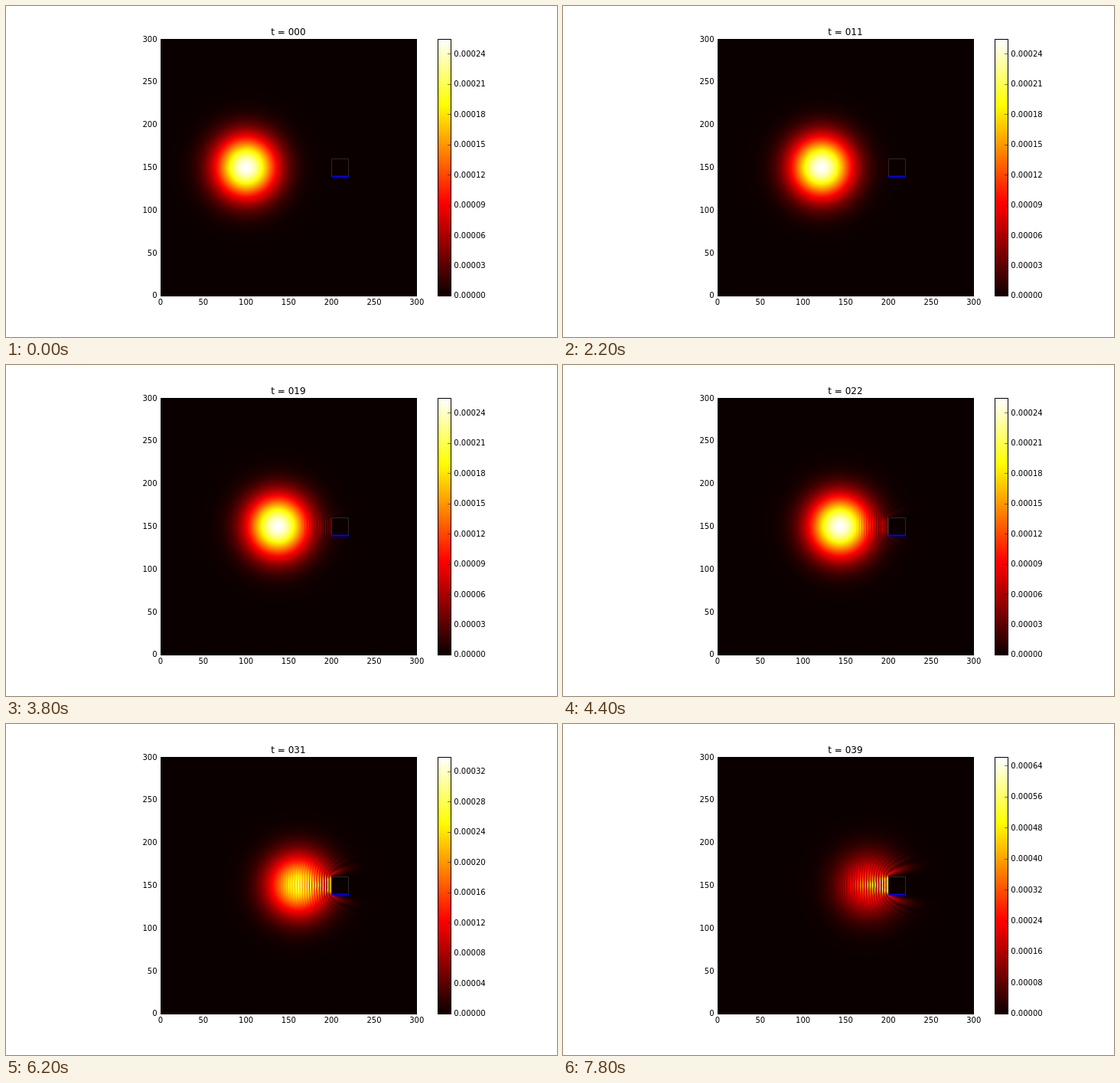
An HTML page with a canvas for the animation above (8 s loop, 720 px wide and 432 px high).

```html
<!DOCTYPE html>
<html lang="en">
<head>
<meta charset="utf-8">
<title>Wave packet hitting a square obstacle</title>
<style>
  html, body { margin: 0; width: 100%; height: 100%; overflow: hidden; background: #fff; }
  canvas, svg { position: absolute; left: 0; top: 0; width: 720px; height: 432px; }
  text { font: 10px "DejaVu Sans", sans-serif; fill: #000; }
  .title { font-size: 12px; }
  .middle { text-anchor: middle; }
  .end { text-anchor: end; }
  .edge { fill: none; stroke: #000; }
</style>
</head>
<body>
<canvas width="720" height="432"></canvas>
<svg viewBox="0 0 720 432">
  <defs>
    <linearGradient id="hot" x1="0" y1="1" x2="0" y2="0">
      <stop offset="0" stop-color="#0b0000"/>
      <stop offset=".365" stop-color="#f00"/>
      <stop offset=".746" stop-color="#ff0"/>
      <stop offset="1" stop-color="#fff"/>
    </linearGradient>
  </defs>
  <rect class="edge" x="202.5" y="43.5" width="334" height="335"/>
  <path d="M425.5 222V199.5H447.5V222" fill="none" stroke="#2d2723"/>
  <path d="M425 222.5H448" stroke="#00f" stroke-width="2"/>
  <rect class="edge" x="564.5" y="43.5" width="17" height="335" style="fill:url(#hot)"/>
  <text id="title" class="title middle" x="369" y="38"></text>
  <g id="axes"></g>
  <g id="scale"></g>
</svg>
<script>
const N = 300, FRAMES = 40, FRAME_MS = 200;
const LEFT = 201.6, BOTTOM = 378, SIZE = 334.8, UNIT = SIZE / N;
const SIGMA = 25, PEAK = 1 / (2 * Math.PI * SIGMA ** 2);

// Schrödinger equation on a lattice; OFFSET puts the packet's energy at zero.
const K = 1.1, SPEED = 1.95, SUBSTEPS = 5, DT = 1 / SUBSTEPS;
const HOP = SPEED / (2 * Math.sin(K));
const OFFSET = 2 * HOP * (Math.cos(K) + 1);
const WALL = { left: 200, right: 220, low: 140, high: 160 };

const re = new Float32Array(N * N), im = new Float32Array(N * N);

function initPacket() {
  for (let y = 0; y < N; y++) {
    for (let x = 0; x < N; x++) {
      const amp = Math.exp(-((x - 100) ** 2 + (y - 150) ** 2) / (4 * SIGMA ** 2));
      re[y * N + x] = amp * Math.cos(K * x);
      im[y * N + x] = amp * Math.sin(K * x);
    }
  }
}

function kick(dst, src, dt) {
  const self = dt * OFFSET, hop = dt * HOP;
  for (let y = 1; y < N - 1; y++) {
    for (let i = y * N + 1, end = y * N + N - 1; i < end; i++) {
      dst[i] += self * src[i] - hop * (src[i - 1] + src[i + 1] + src[i - N] + src[i + N]);
    }
  }
  for (let y = WALL.low; y <= WALL.high; y++) {
    dst.fill(0, y * N + WALL.left, y * N + WALL.right + 1);
  }
}

function advance() {
  kick(im, re, -DT / 2);
  for (let s = 1; s <= SUBSTEPS; s++) {
    kick(re, im, DT);
    kick(im, re, s < SUBSTEPS ? -DT : -DT / 2);
  }
}

// Top of the colour scale relative to the initial peak.
const gain = t => 1 + 0.00588 * Math.max(0, t - 24) ** 2.07;

function paintDensity(t) {
  const tile = document.createElement('canvas');
  tile.width = tile.height = N;
  const ctx = tile.getContext('2d');
  const image = ctx.createImageData(N, N), top = gain(t);
  for (let y = 0; y < N; y++) {
    for (let x = 0; x < N; x++) {
      const i = y * N + x, p = 4 * ((N - 1 - y) * N + x);
      const v = (re[i] ** 2 + im[i] ** 2) / top;
      image.data[p] = 255 * (0.0416 + 0.9584 * v / 0.365);
      image.data[p + 1] = 255 * (v - 0.365) / 0.381;
      image.data[p + 2] = 255 * (v - 0.746) / 0.254;
      image.data[p + 3] = 255;
    }
  }
  ctx.putImageData(image, 0, 0);
  return tile;
}

const label = (x, y, text, cls = '') => `<text class="${cls}" x="${x}" y="${y}">${text}</text>`;
const baseline = y => Math.round(y + 3.4);

function axisLabels() {
  let out = '';
  for (let v = 0; v <= N; v += 50) {
    out += label(LEFT + v * UNIT + 0.4, 390, v, 'middle');
    out += label(197.6, baseline(BOTTOM - v * UNIT), v, 'end');
  }
  return out;
}

function scaleLabels(t) {
  const max = PEAK * gain(t) * 1e5;
  const step = [1, 1.5, 2, 2.5, 3, 4, 5, 6, 8, 10].find(s => s >= max / 10);
  let out = '';
  for (let v = 0; v <= max; v += step) {
    const y = BOTTOM - SIZE * v / max;
    out += `<path d="M577 ${Math.round(y) + 0.5}h4" stroke="#000" stroke-width=".5"/>`;
    out += label(585.3, baseline(y), (v / 1e5).toFixed(5));
  }
  return out;
}

initPacket();
const tiles = [];
for (let t = 0; t < FRAMES; t++) {
  if (t) advance();
  tiles.push(paintDensity(t));
}

const byId = id => document.getElementById(id);
const stage = document.querySelector('canvas').getContext('2d');
byId('axes').innerHTML = axisLabels();

let shown = -1;
function show(now) {
  const t = Math.floor(now / FRAME_MS) % FRAMES;
  if (t !== shown) {
    shown = t;
    stage.clearRect(0, 0, 720, 432);
    stage.drawImage(tiles[t], LEFT, BOTTOM - SIZE, SIZE, SIZE);
    byId('title').textContent = 't = ' + String(t).padStart(3, '0');
    byId('scale').innerHTML = scaleLabels(t);
  }
}

const start = performance.now();
function tick() {
  show(performance.now() - start);
  requestAnimationFrame(tick);
}
tick();
</script>
</body>
</html>
```
